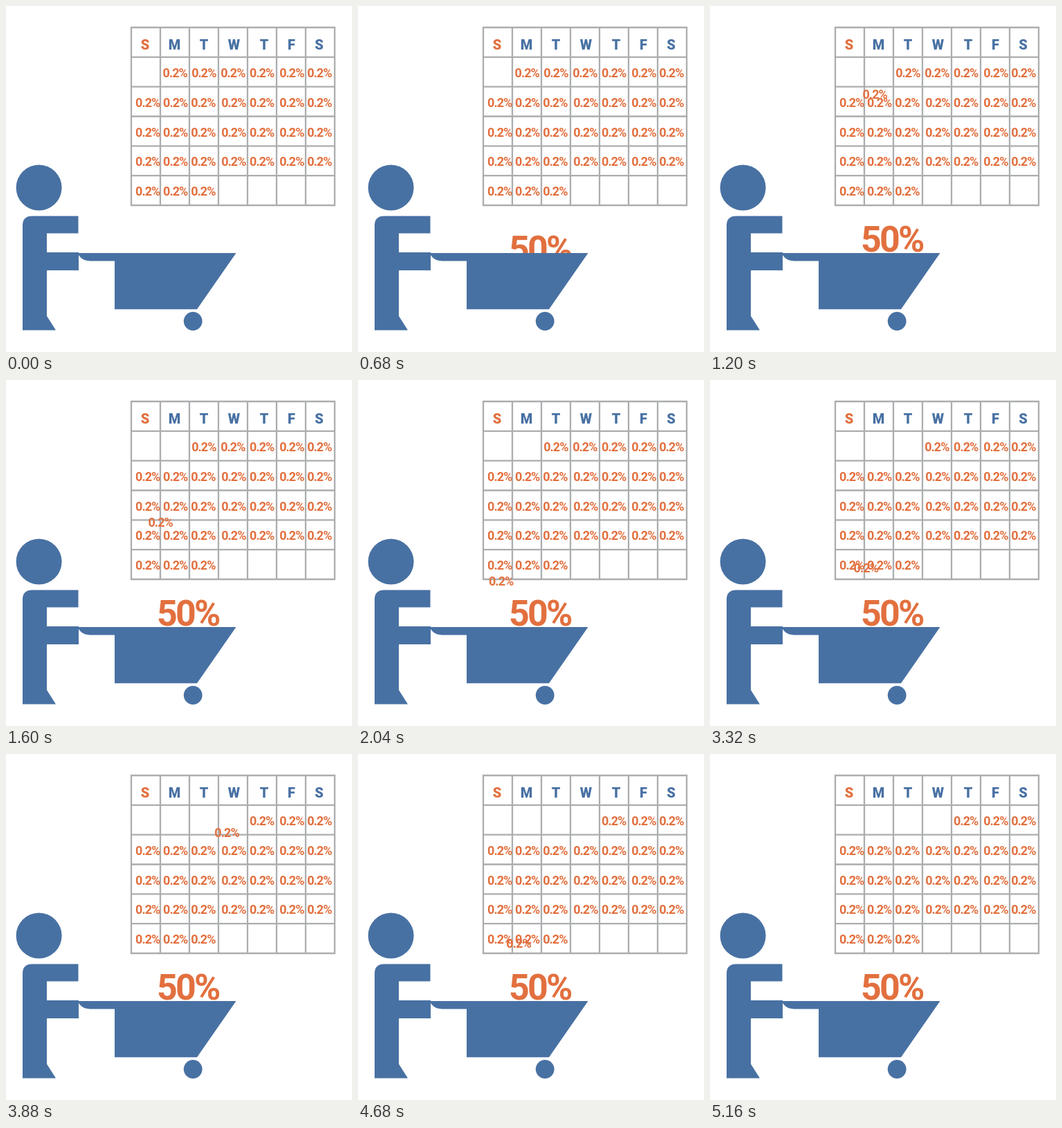
Recreate the animation shown at these times as an HTML page. Size 500x500 px, loop 5.2 s.

```html
<!DOCTYPE html>
<html lang="en">
<head>
<meta charset="utf-8">
<title>Daily percent</title>
<style>
  html, body { margin: 0; width: 100%; height: 100%; overflow: hidden; background: #fff; }
  svg { display: block; width: 100vw; height: 100vh; }
  text { font: 700 18px Roboto, "Open Sans", sans-serif; fill: #e2703f; letter-spacing: -.95px; }
  .day { font-size: 20px; font-weight: 900; letter-spacing: 0; text-anchor: middle; fill: #4871a3; }
  .sunday { fill: #e2703f; }
  #total { font-size: 52px; letter-spacing: -2.75px; }
</style>
</head>
<body>
<svg viewBox="0 0 500 500">
  <clipPath id="aboveCart"><rect width="500" height="357"/></clipPath>
  <path id="grid" fill="none" stroke="#abadaf" stroke-width="2.3" stroke-linecap="square"/>
  <g id="calendar"></g>
  <g clip-path="url(#aboveCart)">
    <text id="total" x="217.9" y="354.5">50%</text>
    <g id="falling"></g>
  </g>
  <g fill="#4871a3">
    <circle cx="47.6" cy="262.5" r="33"/>
    <path d="M24 468.5V317Q24 303.5 38 303.5H104.5V328.5H59V356H105V382H59V448L72 468.5Z"/>
    <path d="M105 357H332.5L276 438.3H157V368.5H125C114 368.5 109 366 105 360Z"/>
    <circle cx="270.2" cy="455.5" r="13.4"/>
  </g>
</svg>
<script>
const LOOP = 5200, RISE_END = 1040, RISE = 41;
const $ = id => document.getElementById(id);

function addText(parent, text, x, y, cls = "") {
  const el = document.createElementNS("http://www.w3.org/2000/svg", "text");
  el.textContent = text;
  el.setAttribute("x", x);
  el.setAttribute("y", y);
  el.setAttribute("class", cls);
  parent.append(el);
  return el;
}

const addPercent = (parent, left, middle) => addText(parent, "0.2%", left - .8, middle + 6.4);

// Calendar
let lines = "";
for (let i = 0; i < 8; i++) lines += `M${181 + 42 * i} 31V288`;
for (let i = 0; i < 7; i++) lines += `M181 ${31 + 42.83 * i}H475`;
$("grid").setAttribute("d", lines);

const dayCenters = [201, 243.5, 286, 329.5, 373, 412.5, 452.5];
[..."SMTWTFS"].forEach((day, i) =>
  addText($("calendar"), day, dayCenters[i], 63, i ? "day" : "day sunday"));

const columns = [187.8, 227.8, 268, 312, 352.8, 396, 436];
for (let cell = 4; cell < 31; cell++) {
  const row = Math.floor(cell / 7);
  addPercent($("calendar"), columns[cell % 7], 97 + 42.65 * row);
}

// Cells that drop into the cart; speeds in px per ms
const drops = [
  { x: 227.3, start: 1040, vx: -.0375, vy: .193 },
  { x: 269, start: 2440, vx: -.06875, vy: .198 },
  { x: 311, start: 3800, vx: -.1088, vy: .201 },
];
for (const drop of drops) drop.el = addPercent($("falling"), drop.x, 97);

function draw(now) {
  const t = now % LOOP;
  const hidden = RISE * Math.max(0, 1 - t / RISE_END);
  $("total").setAttribute("transform", `translate(0 ${hidden})`);
  for (const { el, start, vx, vy } of drops) {
    const dt = Math.max(0, t - start);
    el.setAttribute("transform", `translate(${vx * dt} ${vy * dt})`);
  }
  requestAnimationFrame(draw);
}
draw(performance.now());
</script>
</body>
</html>
```
